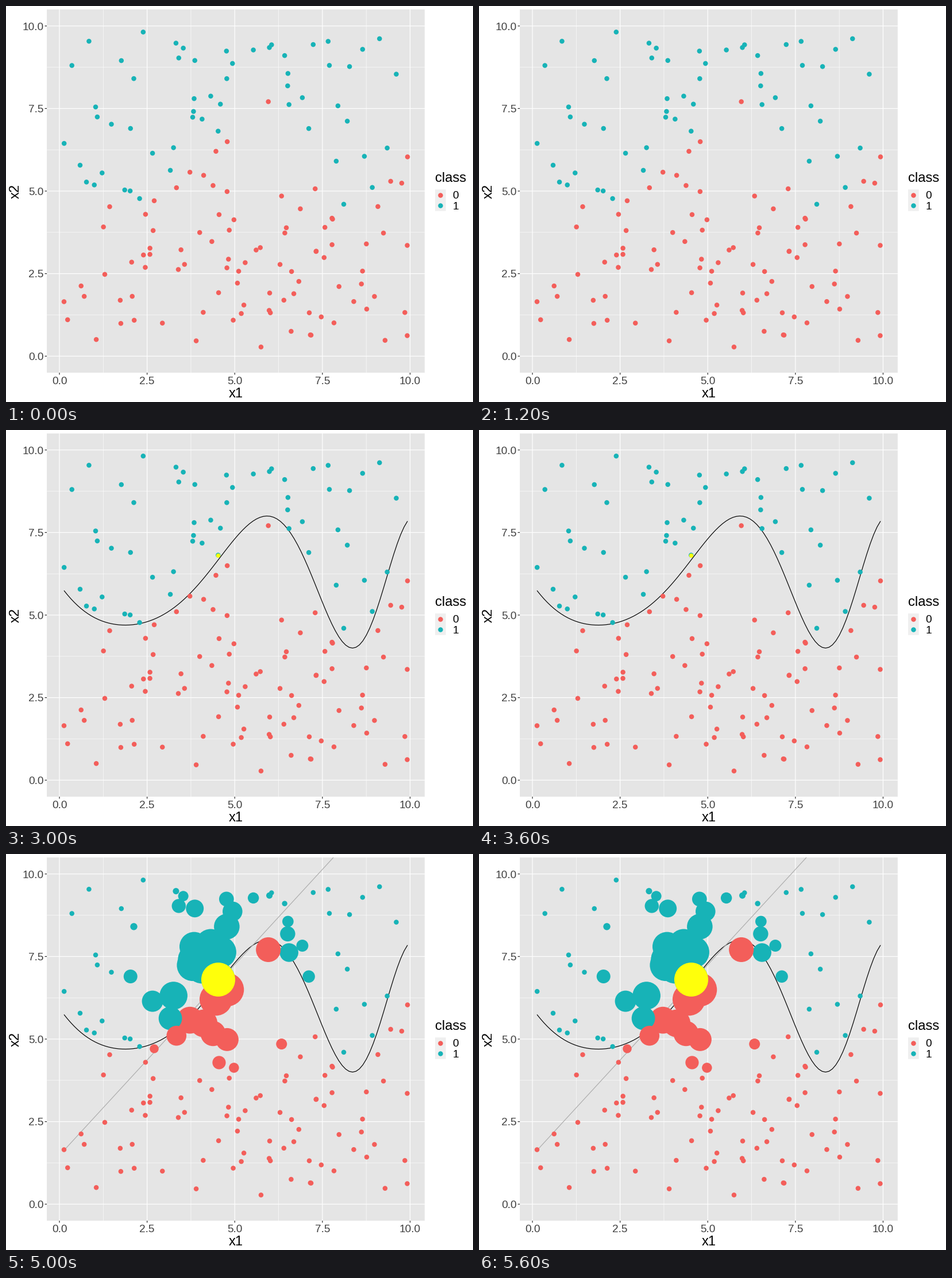
Animation, 813 px wide and 689 px high, one loop 6000 ms. Source, as a matplotlib script:

```python
import random

import numpy as np
import matplotlib.pyplot as plt
from matplotlib.animation import FuncAnimation
from matplotlib.patches import Rectangle

W, H, DPI = 813, 689, 64
PT = 72 / DPI  # points per pixel

RED, TEAL, YELLOW = "#f35e5a", "#17b3b7", "#ffff0b"
PANEL, KEY, INK, TICK = "#e5e5e5", "#efefef", "#404040", "#292929"
LEFT, TOP, RIGHT, BOTTOM = 71.1, 6, 728.9, 638
THIN, THICK, TICK_LEN = 0.6, 1.2, 3.5
TITLE, TEXT = 23.76, 19
DOT, GROWTH, REACH = 4.25, 25.3, 3.0

plt.rcParams["font.family"] = "Liberation Sans"


def uniform(seed, n):
    """Mersenne Twister numbers in [0, 1), state filled by a linear congruence."""
    state = []
    for i in range(675):
        seed = (69069 * seed + 1) % 2**32
        if i > 50:
            state.append(seed)
    random.setstate((3, tuple(state) + (624,), None))
    return np.array([random.getrandbits(32) / 2**32 for _ in range(n)])


x1, x2 = 10 * uniform(1, 300).reshape(2, 150)

# The x axis spans the data and the y axis 0..10, both padded by 5 %.
pad = 0.05 * np.ptp(x1)
X_MIN, X_MAX = x1.min() - pad, x1.max() + pad
Y_MIN, Y_MAX = -0.5, 10.5


def px(x):
    return LEFT + (np.asarray(x) - X_MIN) * (RIGHT - LEFT) / (X_MAX - X_MIN)


def py(y):
    return BOTTOM - (np.asarray(y) - Y_MIN) * (BOTTOM - TOP) / (Y_MAX - Y_MIN)


# The class boundary is a sine wave whose phase bends with x.
KNOTS = [0.13, 0.52, 0.98, 1.75, 2.5, 3.26, 3.96, 4.54, 5.92, 7.15, 8.35, 8.96, 9.93]
PHASE = [-0.125, -0.374, -0.56, -0.7, -0.648, -0.406, -0.043, 0.36, 1.571, 2.98,
         4.712, 5.69, 7.464]
phase = np.poly1d(np.polyfit(KNOTS, PHASE, 6))


def boundary(x):
    return 6 + 2 * np.sin(phase(x))


colors = np.where(x2 > boundary(x1) - 0.025, TEAL, RED)
focus = np.argmin(np.hypot(x1 - 4.525, x2 - 6.82))
dist = np.hypot(x1 - x1[focus], x2 - x2[focus])
weight = np.clip(1 - (dist / REACH) ** 2, 0, None)

fig = plt.figure(figsize=(W / DPI, H / DPI), dpi=DPI, facecolor="white")
ax = fig.add_axes([0, 0, 1, 1])
ax.set_xlim(0, W)
ax.set_ylim(H, 0)
ax.axis("off")


def area(radius):
    return (2 * radius * PT) ** 2


def line(x, y, color, width, z):
    return ax.plot(x, y, color=color, lw=width * PT, zorder=z,
                   solid_capstyle="butt", snap=False)[0]


def dots(x, y, radius, color, z):
    return ax.scatter(x, y, s=area(radius), c=color, linewidths=0, zorder=z)


def label(x, y, text, size, color=INK, **kw):
    ax.text(x, y, text, fontsize=size * PT, color=color, va="baseline", **kw)


def box(x, y, w, h, color):
    ax.add_patch(Rectangle((x, y), w, h, fc=color, ec="none", zorder=0, snap=False))


def grid(v, width):
    line([px(v)] * 2, [TOP, BOTTOM], "white", width, 1)
    line([LEFT, RIGHT], [py(v)] * 2, "white", width, 1)


def draw_axes():
    box(LEFT, TOP, RIGHT - LEFT, BOTTOM - TOP, PANEL)
    for v in np.arange(1.25, 10, 2.5):
        grid(v, THIN)
    for v in np.arange(0, 10.1, 2.5):
        grid(v, THICK)
        line([px(v)] * 2, [BOTTOM, BOTTOM + TICK_LEN], TICK, THICK, 1)
        line([LEFT - TICK_LEN, LEFT], [py(v)] * 2, TICK, THICK, 1)
        label(px(v), 658, f"{v:.1f}", TEXT, ha="center")
        label(65.5, py(v) + 6.8, f"{v:.1f}", TEXT, ha="right")
    label((LEFT + RIGHT) / 2, 680.8, "x1", TITLE, "black", ha="center")
    label(22.3, (TOP + BOTTOM) / 2, "x2", TITLE, "black", ha="center", rotation=90,
          rotation_mode="anchor")


def draw_legend():
    left, size = 747, 18.7
    label(left, 306.3, "class", TITLE, "black")
    for i, color in enumerate((RED, TEAL)):
        y = 328.6 + size * i
        box(left, y - size / 2, size, size, KEY)
        dots([left + size / 2], [y], DOT, color, 4)
        label(777.4, y + 6.8, str(i), TEXT, "black")


draw_axes()
draw_legend()

xs = np.linspace(x1.min(), x1.max(), 101)
curve = line(px(xs), py(boundary(xs)), "black", THICK, 2)

start, slope = 1.63, 1.1545
x_end = xs[0] + (Y_MAX - start) / slope
fit = line(px([xs[0], x_end]), py([start, Y_MAX]), "#adadad", THICK, 3)

points = dots(px(x1), py(x2), DOT, colors, 4)
marker = dots([px(x1[focus])], [py(x2[focus])], DOT, YELLOW, 5)

STAGES = [0, 0, 1, 2, 3, 4]  # data, boundary, chosen point, weights, local fit


def update(i):
    stage = STAGES[i]
    weighted = stage >= 3
    curve.set_visible(stage >= 1)
    marker.set_visible(stage in (2, 4))
    fit.set_visible(stage == 4)
    points.set_sizes(area(DOT + GROWTH * weight * weighted))
    marker.set_sizes([area(DOT + GROWTH if weighted else 3.7)])
    return curve, fit, points, marker


anim = FuncAnimation(fig, update, frames=len(STAGES), interval=1000,
                     repeat=True, repeat_delay=0)
plt.show()
```
